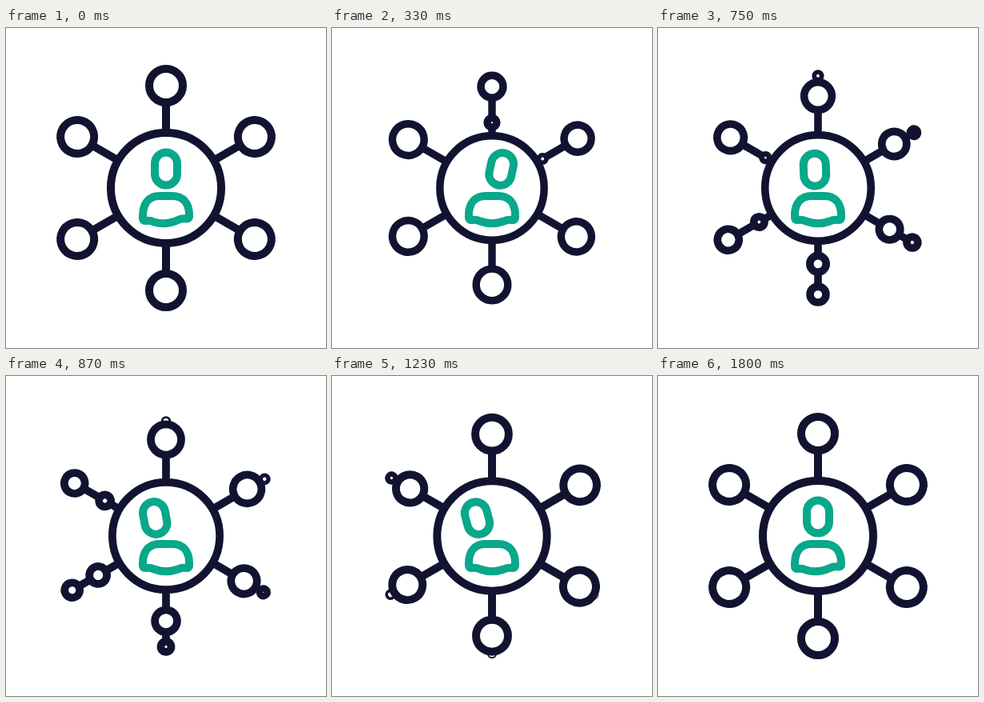
These frames come from a looping animation (400x400 px, 3830 ms). An HTML page:

```html
<!DOCTYPE html>
<html lang="en">
<head>
<meta charset="utf-8">
<title>Person network</title>
<style>
  html, body { margin: 0; height: 100%; overflow: hidden; background: #fff; }
  svg { display: block; width: 100%; height: 100%; fill: none; stroke-width: 10; }
</style>
</head>
<body>
<svg viewBox="0 0 400 400">
  <g id="network" stroke="#121331"><circle r="69"/></g>
  <g stroke="#08a88a" stroke-linejoin="round">
    <rect id="head" x="-14" y="-20.5" width="28" height="41" rx="14"/>
    <path id="body"/>
  </g>
</svg>
<script>
const LOOP = 3830, MOTION_END = 1800, STEP = 30;
const HUB = 69, REACH = 128, NODE = 21;
const SPOKE_DELAY = 100, SPOKE_TIME = 1200;

const network = document.getElementById('network');
const head = document.getElementById('head');
const body = document.getElementById('body');

const spokes = Array.from({ length: 6 }, (_, i) => {
  const group = document.createElementNS('http://www.w3.org/2000/svg', 'g');
  group.setAttribute('transform', `rotate(${i * 60 - 90})`);
  group.innerHTML = '<path/><circle/><circle/>';
  network.append(group);
  return group.children;
});

// cubic-bezier(.33, 0, .33, 1), solved by bisection
function ease(x) {
  if (x <= 0) return 0;
  if (x >= 1) return 1;
  let low = 0, high = 1, u;
  for (let i = 0; i < 24; i++) {
    u = (low + high) / 2;
    if (0.99 * u * (1 - u) + u ** 3 < x) low = u; else high = u;
  }
  return u * u * (3 - 2 * u);
}

const between = (t, start, end) => ease((t - start) / (end - start));

function setCircle(circle, x, r) {
  circle.setAttribute('cx', x);
  circle.setAttribute('r', r);
}

// A new node grows out of the hub while the old one shrinks into its outer tip.
function drawSpoke([line, fresh, old], p) {
  const freshX = HUB + (REACH - HUB) * p, freshR = NODE * p;
  const oldX = REACH + NODE * p, oldR = NODE * (1 - p);
  setCircle(fresh, freshX, freshR);
  setCircle(old, oldX, oldR);
  line.setAttribute('d', `M${HUB} 0H${freshX - freshR}M${freshX + freshR} 0H${oldX - oldR}`);
}

function drawPerson(t) {
  const right = between(t, 0, 450);
  const left = between(t, 540, 1080);
  const back = between(t, 1365, 1800);
  const squash = between(t, 1290, 1440) - between(t, 1440, 1740);
  const x = 12.5 * right - 31 * left + 18.5 * back;
  const y = 0.5 * right + 1.2 * left - 1.7 * back + 1.5 * squash;
  const angle = 13 * right - 28 * left + 15 * back;
  head.setAttribute('transform', `translate(${200 + x} ${176 + y}) rotate(${angle})`);

  const tilt = 1 - between(t, 0, 300) + between(t, 1260, 1440);
  const l = 240 + tilt, r = 240 - 1.5 * tilt;
  body.setAttribute('d', `M171 ${l - 6}C171 219 179 210 192 210H208C221 210 229 219 229 234
    V${r - 3}Q229 ${r} 226 ${r}Q220 ${r - 1} 215 ${r + 1.5}Q200 247 185 ${l + 1.5}
    Q180 ${l - 1} 174 ${l}Q171 ${l} 171 ${l - 3}Z`);
  body.setAttribute('transform',
    `translate(200 245) scale(${1 + 0.025 * squash} ${1 - 0.025 * squash}) translate(-200 -245)`);
}

function draw(now) {
  const t = Math.min(Math.floor(now % LOOP / STEP) * STEP, MOTION_END);
  const scale = 1 - 0.058 * (between(t, 0, 420) - between(t, 420, 1590));
  network.setAttribute('transform', `translate(200 200) scale(${scale})`);
  spokes.forEach((spoke, i) => drawSpoke(spoke, ease((t - i * SPOKE_DELAY) / SPOKE_TIME)));
  drawPerson(t);
}

const start = performance.now();
function tick() {
  draw(performance.now() - start);
  requestAnimationFrame(tick);
}
tick();
</script>
</body>
</html>
```
